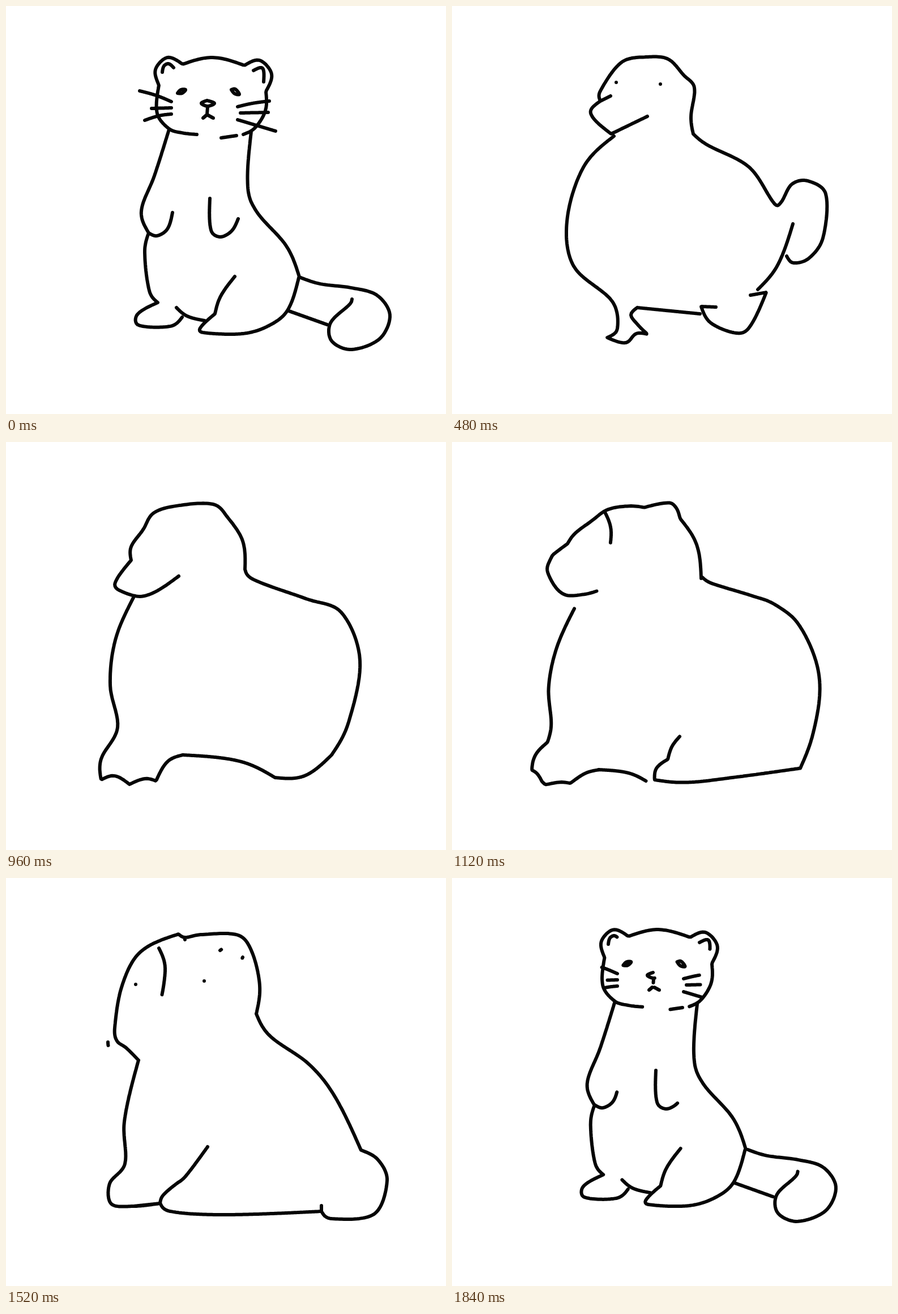
Animation of 777x721 px, one loop 1.92 s. Source, as an HTML page:

```html
<!DOCTYPE html>
<html lang="en">
<meta charset="utf-8">
<title>Morphing animals</title>
<style>
  html, body { margin: 0; width: 100%; height: 100%; overflow: hidden; background: #fff }
  svg { display: block; width: 100%; height: 100% }
  path { fill: none; stroke: #060606; stroke-width: 6; stroke-linecap: round; stroke-linejoin: round }
</style>
<svg viewBox="0 0 777 721"><path id="ink"/></svg>
<script>
const LOOP = 22, TICK = 80, TICKS = 24, SAMPLES = 160;

// Lines that bend from pose to pose: step -> key points of a smooth curve.
// "/" marks a corner after a point, an empty text hides the line.
const outlines = [
  { // head
    0: '337,227 310,224 288,217 267,190 270,140/264,112 285,91 312,103/365,91 421,105/448,96 469,120 459,151/458,185 440,215 419,227',
    4: '294,227 265,212 253,188 273,133/270,120 293,98 308,97/346,90 390,97 420,114 439,117 447,137 442,183 428,211',
    6: '345,195 281,226/245,190 262,168/262,150 300,99 346,90 382,94 409,122 428,144 422,195 426,226',
    11: '305,237 245,272 200,262 193,248 221,209/221,185 242,155 260,126 300,113 366,110 392,134 418,175 422,225',
    15: '206,290 180,288 143,272 137,220 154,166/270,117 330,112 361,121/407,106 417,118 418,142/446,187 458,257',
    17: '234,322 212,300 196,288 192,265 205,190 237,131 305,99/316,105 345,100 410,101 434,130 448,190 442,240'
  },
  { // chest and front foot
    0: '288,218 262,300 239,362 252,401/245,435 253,503 268,524/232,545 234,564 290,566 311,550',
    4: '287,229 230,307 216,372 241,407/230,455 243,498 275,519 276,550 290,562 310,560 341,531',
    6: '286,230 232,285 203,380 215,460 283,522 292,570 274,586/307,595 325,579 345,580/327,562 316,546 327,533',
    11: '225,275 193,350 184,430 197,505 168,560 168,597/192,590 218,605/245,595 265,599/285,565 312,553',
    15: '207,314 160,425 154,527/120,550 107,600/120,607 210,605',
    17: '234,322 209,430 210,505 183,540 186,576 225,580 272,575'
  },
  { // belly
    0: '301,533 320,548 351,556',
    4: '341,531 430,566',
    6: '327,533 438,544',
    11: '312,553 412,564 475,593',
    15: '205,605 210,605',
    17: '225,580 272,575'
  },
  { // hind leg
    0: '404,478 379,513 369,544/343,569 348,577 418,579 464,565 497,538 517,480',
    4: '430,566 482,579 506,573 520,535 517,521',
    6: '466,532 440,531/457,560 502,578 525,568 555,506/527,511',
    11: '475,593 527,590 575,553',
    15: '329,448 293,483 270,527/220,558 205,600/300,613 450,608 655,600',
    17: '356,475 318,526 304,538/278,560 272,574/290,589 385,595 557,589'
  },
  { // back and tail
    0: '433,222 427,320 443,364 495,424 518,479/555,491 610,498 655,511 678,546 660,588 610,607 575,592 573,560 607,527 611,518',
    4: '426,212 450,268 517,355 534,402 546,421 574,418 605,384 645,371 675,389 694,440 675,500 628,522 590,480 619,430',
    6: '426,226 450,245 525,285 570,350 581,347 600,315 628,309 660,332 655,410 630,446 603,454 591,442',
    8: '423,226 490,262 580,300 624,292/605,400 546,528',
    11: '422,225 437,243 530,277 592,301 625,385 605,495 575,553',
    15: '463,254 560,277 600,297 660,400 677,480 655,600',
    17: '442,240 466,279 535,329 580,385 627,481/657,498 673,535 650,594 575,602 557,589'
  },
  { // underside of the tail
    0: '567,563 497,538', 4: '590,471 517,524', 6: '602,385 575,458 540,501',
    7: '', 17: '557,589 557,579'
  },
  { // left eye, later the nostril
    0: '303,154 309,148 317,148 311,154 303,154', 4: '311,150', 6: '290,135', 8: '285,148',
    9: '', 15: '162,191 175,187 187,188', 17: '229,188'
  },
  { // right eye
    0: '398,148 405,147 412,156 404,155 398,148', 4: '405,151', 6: '368,138', 8: '358,150',
    9: '', 15: '330,175 348,178 367,191 349,186 330,175', 17: '350,182'
  }
];

// Lines that are drawn out from their first point before a pose and retracted after it.
const details = [
  { at: 0, grow: 2, fade: 4.2, lines: [ // nose and whiskers
    '355,167 345,172 356,177 368,172 355,167', '356,178 355,192',
    '292,169 265,158 236,150', '292,180 257,181', '292,191 270,194 245,202',
    '409,178 435,172 465,168', '414,189 463,188', '409,201 476,221'] },
  { at: 0, grow: 5, fade: 3, lines: [ // mouth, inner ears, chin, paws
    '348,198 355,192', '366,198 355,192',
    '276,117 279,106 287,102 296,109', '437,114 453,110 455,134', '407,229 380,233',
    '252,401 267,406 285,394 294,365', '360,340 362,396 378,408 398,398 410,376'] },
  { at: 6, grow: 2, fade: 3, lines: ['262,168 280,159'] }, // bill
  { at: 15, grow: 2, fade: 2.2, lines: [ // ears and jaw
    '378,128 391,121 405,121', '316,109 308,94 287,109', '418,140 410,155',
    '180,290 184,302 207,312 232,315'] },
  { at: 15, grow: 3, fade: 4, lines: ['270,124 281,165 264,250 240,280'] } // cheek
];

const mix = (a, b, u) => a.map((v, k) => v + (b[k] - v) * u);
const gap = (a, b) => Math.hypot(a[0] - b[0], a[1] - b[1]);

// Dense smooth curve through the given points.
function curve(p) {
  const t = [0], last = p.length - 1, out = [p[0]];
  for (let i = 1; i <= last; i++) t[i] = t[i - 1] + Math.sqrt(gap(p[i], p[i - 1]));
  const chord = (a, b, k) => (p[b][k] - p[a][k]) / (t[b] - t[a]);
  const slope = (i, k) => {
    if (last === 1) return chord(0, 1, k);
    if (i === 0) return 1.5 * chord(0, 1, k) - 0.5 * slope(1, k);
    if (i === last) return 1.5 * chord(last - 1, last, k) - 0.5 * slope(last - 1, k);
    return chord(i - 1, i + 1, k);
  };
  for (let i = 0; i < last; i++) {
    const h = t[i + 1] - t[i];
    for (let n = 1; n <= 10; n++) {
      const u = n / 10, v = 1 - u;
      out.push([0, 1].map(k =>
        p[i][k] * v * v * (1 + 2 * u) + p[i + 1][k] * u * u * (3 - 2 * u) +
        h * u * v * (slope(i, k) * v - slope(i + 1, k) * u)));
    }
  }
  return out;
}

// Evenly spaced points along a polyline.
function resample(p) {
  const d = [0];
  for (let i = 1; i < p.length; i++) d[i] = d[i - 1] + gap(p[i], p[i - 1]);
  const total = d.at(-1);
  let i = 0;
  return Array.from({ length: SAMPLES + 1 }, (_, n) => {
    const at = total * n / SAMPLES;
    while (i < p.length - 2 && d[i + 1] < at) i++;
    return total ? mix(p[i], p[i + 1], (at - d[i]) / (d[i + 1] - d[i] || 1)) : p[0];
  });
}

function stroke(text) {
  if (!text) return null;
  const out = [];
  let corner;
  for (const run of text.split('/')) {
    const p = run.split(' ').map(s => s.split(',').map(Number));
    if (corner) p.unshift(corner);
    corner = p.at(-1);
    out.push(...curve(p));
  }
  return resample(out);
}

const path = points => 'M' + points.map(p => p.map(v => v.toFixed(1))).join('L');

// Every outline ends the loop in the shape it began with.
const tracks = outlines.map(keys =>
  Object.entries({ ...keys, [LOOP]: keys[0] }).map(([step, text]) => ({ step: +step, points: stroke(text) })));
for (const group of details) group.lines = group.lines.map(stroke);

function drawOutline(track, step) {
  const next = track.findIndex(key => key.step > step);
  const a = track[next - 1], b = track[next];
  if (!a.points) return '';
  if (a.step === step) return path(a.points);
  if (!b.points) return '';
  let u = (step - a.step) / (b.step - a.step);
  if (b.step === LOOP) u = 1 - (1 - u) ** 3; // settle into the first pose
  return path(a.points.map((p, i) => mix(p, b.points[i], u)));
}

function drawDetails({ at, grow, fade, lines }, step) {
  const since = (step - at + LOOP) % LOOP;
  const part = Math.max(1 - since / fade, 1 - (LOOP - since) / grow);
  if (part <= 0) return '';
  return lines.map(points => path(points.slice(0, Math.round(part * SAMPLES) + 1))).join('');
}

const ink = document.getElementById('ink');
const start = performance.now();
let shown = -1;

function draw(now) {
  const tick = Math.floor(Math.max(now - start, 0) / TICK) % TICKS;
  const step = tick - (tick > 8) - (tick > 16); // duck and capybara stay for two ticks
  if (step !== shown) {
    shown = step;
    ink.setAttribute('d',
      tracks.map(track => drawOutline(track, step)).join('') +
      details.map(group => drawDetails(group, step)).join(''));
  }
  requestAnimationFrame(draw);
}
draw(start);
</script>
</html>
```
